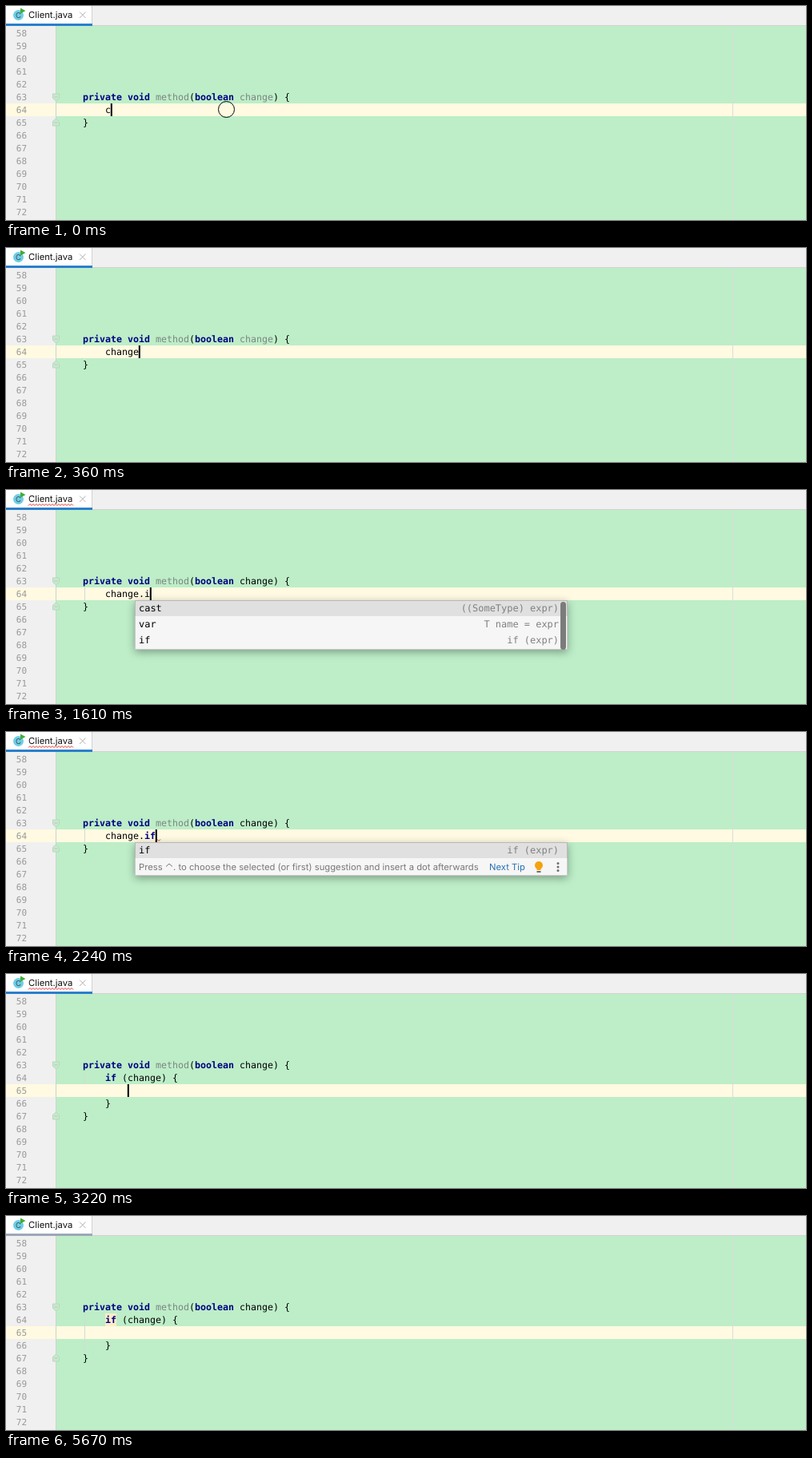
Write an HTML page with a canvas that moves like this. It is 1000 by 268 pixels and loops after 5.77 s.

```html
<!DOCTYPE html>
<html lang="en">
<head>
<meta charset="utf-8">
<title>Postfix completion</title>
<style>
  html, body { margin: 0; width: 100%; height: 100%; overflow: hidden; }
  canvas { display: block; width: 1000px; height: 268px; }
</style>
</head>
<body>
<canvas width="1000" height="268"></canvas>
<script>
const LOOP = 5770, ROW = 16, CHAR = 7;
const CODE = '11.628px "DejaVu Sans Mono", monospace';
const LIST = '11.96px "DejaVu Sans Mono", monospace';
const UI = '11.25px Inter, sans-serif';
const NAVY = '#000080', GRAY = '#7d8480', RED = '#e5352c';
const ctx = document.querySelector('canvas').getContext('2d');
ctx.textRendering = 'geometricPrecision';

// What is typed on line 64, by start time
const typing = [
  [0, 'c'], [90, 'ch'], [180, 'chan'], [270, 'chang'], [360, 'change'],
  [890, 'change.'], [1520, 'change.i'], [1700, 'change.if']
];
const suggestions = [
  ['cast', '((SomeType) expr)'], ['var', 'T name = expr'], ['if', 'if (expr)'],
  ['return', 'return expr'], ['soutv', 'System.out.println(expr)'],
  ['not', '!expr'], ['sout', 'System.out.println(expr)']
];

const rowTop = line => 26 + (line - 58) * ROW;
const within = (t, from, to) => t >= from && t < to;

function rect(x, y, w, h, color) {
  ctx.fillStyle = color;
  ctx.fillRect(x, y, w, h);
}

function text(str, x, y, color = '#000', font = CODE, align = 'left') {
  ctx.font = font;
  ctx.textAlign = align;
  ctx.fillStyle = color;
  ctx.fillText(str, x, y);
}

function polyline(points, color, width = 1) {
  ctx.beginPath();
  points.forEach(([x, y]) => ctx.lineTo(x, y));
  ctx.strokeStyle = color;
  ctx.lineWidth = width;
  ctx.stroke();
}

function disc(x, y, r, color) {
  ctx.beginPath();
  ctx.arc(x, y, r, 0, 7);
  ctx.fillStyle = color;
  ctx.fill();
}

function squiggle(x, y, width) {
  const points = [];
  for (let i = 0; i <= width; i += 2) points.push([x + i, y + (i % 4 ? 0 : 2)]);
  polyline(points, RED);
}

// Code pieces are [string, color, bold], laid out on the character grid
function code(line, column, ...pieces) {
  let x = 96 + column * CHAR;
  for (const [str, color, bold] of pieces) {
    text(str, x, rowTop(line) + 12, color, (bold ? 'bold ' : '') + CODE);
    x += str.length * CHAR;
  }
}

function caret(line, x) {
  rect(x - .2, rowTop(line), 2, ROW, '#000');
}

function foldMark(line, up) {
  const y = rowTop(line) + 8, d = up ? -1 : 1;
  ctx.beginPath();
  [[58.5, -4], [66.5, -4], [66.5, 1.5], [62.5, 5], [58.5, 1.5]]
    .forEach(([x, dy]) => ctx.lineTo(x, y + dy * d));
  ctx.closePath();
  ctx.fillStyle = '#c9e8ce';
  ctx.fill();
  ctx.strokeStyle = '#b5d9bc';
  ctx.lineWidth = 1;
  ctx.stroke();
  rect(60.5, y - .5, 4, 1, '#b0d0b6');
}

function tab(t) {
  rect(0, 0, 1000, 24, '#f0f0f0');
  rect(0, 24, 1000, 1, '#d1d1d1');
  rect(0, 0, 107, 24, '#fff');
  rect(107, 0, 1, 24, '#d1d1d1');
  rect(0, 22, 108, 3, t >= 5670 ? '#9ca7b8' : '#2a7fcb');
  disc(15.5, 11.5, 6.5, '#6fcde4');
  text('C', 15.5, 15, '#36525c', '9.5px Inter, sans-serif', 'center');
  ctx.beginPath();
  [[18, 2.5], [24.5, 6], [18, 9.5]].forEach(p => ctx.lineTo(...p));
  ctx.fillStyle = '#3fae35';
  ctx.fill();
  text('Client.java', 28, 15, '#111', UI);
  polyline([[92, 7.5], [99.5, 15]], '#b4b4b4');
  polyline([[99.5, 7.5], [92, 15]], '#b4b4b4');
  if (within(t, 710, 3550)) squiggle(28, 17.5, 56);
}

function popupPanel(x, height) {
  ctx.save();
  ctx.shadowColor = 'rgba(0,0,0,.35)';
  ctx.shadowBlur = 10;
  ctx.shadowOffsetY = 3;
  rect(x, 138, 541, height, '#f6f6f6');
  ctx.restore();
  rect(x, 138, 541, 20, '#e0e0e0');
  ctx.strokeStyle = 'rgba(0,0,0,.18)';
  ctx.lineWidth = 1;
  ctx.strokeRect(x + .5, 138.5, 540, height - 1);
}

function popupRow(x, index, [name, detail], indent = 5, bold = '') {
  const y = 152 + index * 20;
  text(name, x + indent, y, '#000', bold + LIST);
  text(detail, x + 530, y, '#808080', LIST, 'right');
}

function suggestionList(count, height) {
  popupPanel(161, height);
  suggestions.slice(0, count).forEach((item, i) => popupRow(161, i, item));
  ctx.beginPath();
  ctx.roundRect(693, 140, 7, height - 2, 3.5);
  ctx.fillStyle = '#7b7b7b';
  ctx.fill();
}

function tipRow(x, bulb) {
  const y = 173;
  text('Press', x + 5, y, '#777', UI);
  polyline([[x + 39, 168.5], [x + 43, 165], [x + 47, 168.5]], '#777');
  text('. to choose the selected (or first) suggestion and insert a dot afterwards',
    x + 48, y, '#777', UI);
  text('Next Tip', x + 443, y, '#2470b3', UI);
  if (bulb) {
    disc(x + 505, 167, 5, '#f4a30c');
    rect(x + 502.5, 170, 5, 3, '#f4a30c');
    rect(x + 502.5, 174, 5, 2, '#6e6e6e');
  }
  [164.5, 169, 173.5].forEach(dotY => disc(x + 529, dotY, 1.5, '#6e6e6e'));
}

function popups(t) {
  if (within(t, 180, 360)) {
    popupPanel(98, 42);
    disc(111, 148, 6.5, '#f7a3b1');
    text('p', 111, 151, '#5c3b41', '9.5px Inter, sans-serif', 'center');
    popupRow(98, 0, ['change', 'boolean'], 24, 'bold ');
    tipRow(98, false);
  } else if (within(t, 980, 1610)) {
    suggestionList(7, 150);
  } else if (within(t, 1610, 1700)) {
    suggestionList(3, 62);
  } else if (within(t, 1700, 3140)) {
    popupPanel(161, 42);
    popupRow(161, 0, suggestions[2]);
    tipRow(161, t >= 2240);
  }
}

function typingPhase(t) {
  const typed = typing.findLast(([start]) => t >= start)[1];
  const keyword = typed.endsWith('if');
  const end = 124 + typed.length * CHAR;
  code(64, 4, [keyword ? typed.slice(0, -2) : typed, '#000'],
    [keyword ? 'if' : '', NAVY, true]);
  code(65, 0, ['}', '#000']);
  if (within(t, 710, 1520) || t >= 1700) squiggle(end, 134.5, 7);
  if (!within(t, 2510, 3050)) caret(64, end);
  if (t < 90) {
    ctx.beginPath();
    ctx.arc(275.5, 129.5, 10, 0, 7);
    ctx.strokeStyle = '#000';
    ctx.lineWidth = 1;
    ctx.stroke();
  }
}

function expandedPhase(t) {
  if (t >= 3640) rect(124, rowTop(64), 14, ROW, '#fdedc8');
  code(64, 4, ['if', NAVY, true], [' (change) {', '#000']);
  code(66, 4, ['}', '#000']);
  code(67, 0, ['}', '#000']);
  if (!within(t, 4530, 4970) && t < 5510) caret(65, 152);
  if (within(t, 4260, 4350)) {
    polyline([[364, 147.5], [366, 147.5], [367.5, 149], [367.5, 158], [366, 159.5], [364, 159.5]], '#000');
    polyline([[371, 147.5], [369, 147.5], [367.5, 149], [367.5, 158], [369, 159.5], [371, 159.5]], '#000');
    polyline([[365.5, 155.5], [369.5, 155.5]], '#000');
  }
}

function draw(t) {
  const expanded = t >= 3140;
  rect(0, 0, 1000, 268, '#bdeec8');
  rect(0, 25, 62, 243, '#f0f0f0');
  rect(0, rowTop(expanded ? 65 : 64), 1000, ROW, '#fffae1');
  rect(62, 25, 1, 243, '#cfd2cf');
  rect(908, 25, 1, 243, '#d8dcd9');
  for (let line = 58; line <= 72; line++)
    text(line, 26, rowTop(line) + 12, '#999', '11px "DejaVu Sans Mono", monospace', 'right');
  foldMark(63, false);
  foldMark(expanded ? 67 : 65, true);
  if (t >= 710) rect(98, 122, 1, t >= 3550 ? 48 : 16, '#d3dcd0');

  code(63, 0, ['private void ', NAVY, true], ['method', GRAY], ['(', '#000'],
    ['boolean ', NAVY, true], ['change', t < 710 ? GRAY : '#000'], [') {', '#000']);
  (expanded ? expandedPhase : typingPhase)(t);
  tab(t);
  popups(t);
}

function frame() {
  draw(performance.now() % LOOP);
  requestAnimationFrame(frame);
}
frame();
</script>
</body>
</html>
```
